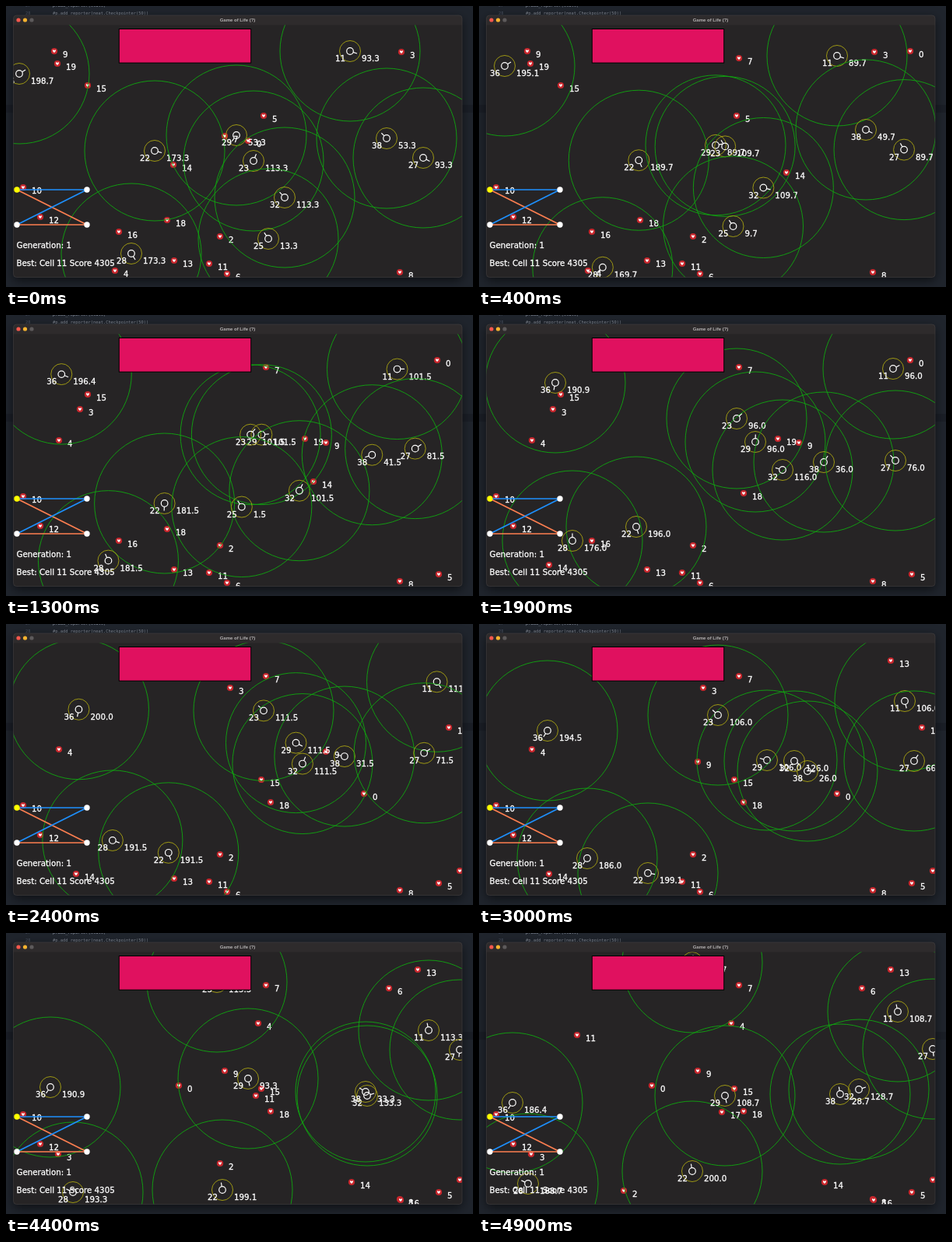
An HTML page with a canvas that plays this animation: 600 by 361 pixels, repeating every 5000 ms.

```html
<!DOCTYPE html>
<html lang="en">
<head>
<meta charset="utf-8">
<title>Game of Life (?)</title>
<style>
html, body { margin: 0; width: 100%; height: 100%; overflow: hidden; background: #20252d; }
canvas { display: block; width: 600px; height: 361px; }
</style>
</head>
<body>
<canvas id="stage" width="600" height="361"></canvas>
<script>
const ctx = document.getElementById('stage').getContext('2d');
const STEP = 100, STEPS = 50;
const SPEED = 4.85, BURN = 0.91, MEAL = 20, MAX_ENERGY = 200, REACH = 14.8;
const KEYS = [0, 8, 19, 30, 36, 44, 49];   // steps at which cells pass their key points
const cells = [], foods = [];

const pairs = a => a.flatMap((v, i) => i % 2 ? [] : [[v, a[i + 1]]]);
const dist = (p, q) => Math.hypot(p[0] - q[0], p[1] - q[1]);
const cell = (id, energy, ...path) => cells.push({ id, energy, path: pairs(path) });
// A food jumps to its next spot when eaten
const food = (id, ...spots) => foods.push({ id, spots: pairs(spots) });

cell(11, 93.3, 442, 58, 478, 70, 532, 69, 547, 99, 554, 128, 543, 125, 538, 101);
cell(36, 198.7, 17, 87, 49, 67, 98, 87, 88, 137, 72, 162, 57, 198, 43, 218);
cell(22, 173.3, 191, 186, 205, 217, 202, 272, 217, 320, 247, 325, 278, 330, 274, 306);
cell(28, 173.3, 161, 318, 141, 337, 120, 290, 139, 301, 122, 325, 86, 333, 63, 322);
cell(29, 53.3, 296, 166, 307, 164, 355, 163, 370, 175, 341, 167, 311, 187, 316, 209);
cell(23, 113.3, 318, 199, 300, 171, 331, 133, 307, 117, 286, 97, 271, 63, 274, 38);
cell(32, 113.3, 358, 246, 366, 248, 390, 199, 405, 176, 431, 193, 464, 209, 488, 201);
cell(38, 53.3, 489, 170, 493, 172, 443, 189, 422, 189, 451, 192, 462, 204, 464, 207);
cell(27, 93.3, 536, 195, 532, 188, 535, 187, 559, 176, 575, 151, 583, 150, 583, 149);
cell(25, 13.3, 337, 299, 316, 267, 287, 222);

food(0, 311, 173, 554, 58, 460, 218, 474, 216, 222, 196);
food(2, 275, 296, 186, 331);
food(3, 508, 59, 95, 121, 288, 82, 67, 284);
food(4, 140, 340, 68, 161, 324, 116);
food(5, 331, 141, 556, 333);
food(6, 284, 344, 492, 71);
food(7, 281, 167, 334, 67);
food(8, 506, 342);
food(9, 62, 58, 411, 164, 281, 177);
food(10, 22, 233);
food(11, 261, 331, 321, 209, 126, 131);
food(12, 44, 271);
food(13, 216, 327, 529, 47);
food(14, 215, 204, 395, 214, 90, 321, 444, 320);
food(15, 105, 102, 330, 112, 328, 200);
food(16, 145, 290, 569, 133, 507, 343);
food(17, 270, 45, 312, 230);
food(18, 207, 275, 340, 229);
food(19, 66, 74, 384, 159, 583, 317);

// Half the turn of an arc whose chord is the given share of its length
function halfTurn(share) {
  if (share > 0.91) return 1e-6;
  let lo = 0, hi = Math.PI;
  for (let i = 0; i < 30; i++) {
    const mid = (lo + hi) / 2;
    if (Math.sin(mid) / mid > share) lo = mid; else hi = mid;
  }
  return lo;
}

// Cells keep their speed, so between near points they swing out in an arc
function makeArc(a, b, steps) {
  const chord = dist(a, b), turn = halfTurn(chord / (SPEED * steps));
  const base = Math.atan2(b[1] - a[1], b[0] - a[0]);
  const at = (u, side) => {
    const r = chord * Math.sin(turn * u) / Math.sin(turn);
    const dir = base + side * turn * (1 - u);
    return [a[0] + r * Math.cos(dir), a[1] + r * Math.sin(dir)];
  };
  const gap = side => Math.min(...foods.map(f => dist(f.spots[0], at(0.5, side))));
  const side = gap(1) < gap(-1) ? 1 : -1;   // towards the nearest food
  return u => ({ pos: at(u, side), heading: base + side * turn * (1 - 2 * u) });
}

function move(c, step) {
  const last = c.path.length - 2;
  const i = Math.min(last, KEYS.findLastIndex(k => k <= step));
  const span = KEYS[i + 1] - KEYS[i];
  if (step === KEYS[i]) c.arc = makeArc(c.path[i], c.path[i + 1], span);
  Object.assign(c, c.arc((step - KEYS[i]) / span));
}

function eat(c) {
  for (const f of foods) {
    if (f.spots.length > 1 && dist(c.pos, f.spots[0]) < REACH) {
      f.spots.shift();
      c.energy = Math.min(MAX_ENERGY, c.energy + MEAL);
    }
  }
}

// Play the whole loop once and keep every state
const states = Array.from({ length: STEPS }, (_, step) => {
  const alive = cells.filter(c => c.energy > 0);
  for (const c of alive) {
    move(c, step);
    if (step) {
      c.energy -= BURN;
      eat(c);
    }
  }
  return {
    cells: alive.filter(c => c.energy > 0).map(c => ({ ...c })),
    foods: foods.map(f => ({ id: f.id, pos: f.spots[0] }))
  };
});

function rect(x, y, w, h, color) {
  ctx.fillStyle = color;
  ctx.fillRect(x, y, w, h);
}
function disc(x, y, r, color) {
  ctx.fillStyle = color;
  ctx.beginPath();
  ctx.arc(x, y, r, 0, 7);
  ctx.fill();
}
function ring(x, y, r, color, width = 0.9) {
  ctx.strokeStyle = color;
  ctx.lineWidth = width;
  ctx.beginPath();
  ctx.arc(x, y, r, 0, 7);
  ctx.stroke();
}
function line(x1, y1, x2, y2, color, width) {
  ctx.strokeStyle = color;
  ctx.lineWidth = width;
  ctx.beginPath();
  ctx.moveTo(x1, y1);
  ctx.lineTo(x2, y2);
  ctx.stroke();
}
function text(s, x, y, font, color, align = 'left') {
  ctx.font = font;
  ctx.fillStyle = color;
  ctx.textAlign = align;
  ctx.fillText(s, x, y);
}
function label(s, x, y) {
  text(s, x, y, '10.25px "DejaVu Sans", sans-serif', '#fff');
  ctx.strokeStyle = '#fff';
  ctx.lineWidth = 0.3;
  ctx.strokeText(s, x, y);
}

function drawDesktop() {
  rect(0, 0, 600, 361, '#20252d');
  rect(0, 127, 600, 10, '#1b1f27');
  const mono = '5.4px "DejaVu Sans Mono", monospace';
  text('27', 25, 1, mono, '#4b5263');
  text('28', 25, 11, mono, '#4b5263');
  text('p.add_reporter(stats)', 60, 1, mono, '#9aa2b1');
  text('#p.add_reporter(neat.Checkpointer(50))', 60, 11, mono, '#858b96');
}

function drawFood({ id, pos: [x, y] }) {
  disc(x, y, 4.1, '#c9272d');
  ctx.fillStyle = '#fff';
  ctx.beginPath();
  ctx.moveTo(x, y + 2);
  ctx.bezierCurveTo(x - 3.8, y - 1, x - 1.3, y - 2.8, x, y - 0.8);
  ctx.bezierCurveTo(x + 1.3, y - 2.8, x + 3.8, y - 1, x, y + 2);
  ctx.fill();
  label(id, x + 11, y + 8);
}

function drawCell({ id, energy, pos: [x, y], heading }) {
  const cos = Math.cos(heading), sin = Math.sin(heading);
  ring(x, y, 90, '#10a810');
  ring(x, y, 13.5, '#aaa412');
  ring(x, y, 4.3, '#fff', 1.2);
  line(x + cos * 4.3, y + sin * 4.3, x + cos * 9.5, y + sin * 9.5, '#fff', 1.2);
  label(id, x - 19, y + 13);
  label(energy.toFixed(1), x + 15, y + 13);
}

function drawNet() {
  const L = 14, R = 104, T = 236, B = 281, blue = '#1e90ff', coral = '#ff7f50';
  line(L, T, R, T, blue, 1.7);
  line(L, T, R, B, coral, 1.7);
  line(L, B, R, T, blue, 1.7);
  line(L, B, R, B, coral, 1.7);
  disc(L, T, 3.7, '#ffff00');
  for (const [x, y] of [[R, T], [L, B], [R, B]]) disc(x, y, 3.7, '#fff');
}

function drawWindow(state) {
  const frame = new Path2D();
  frame.roundRect(9.5, 12, 576.5, 336.5, 4);
  ctx.save();
  ctx.shadowColor = 'rgba(0, 0, 0, .6)';
  ctx.shadowBlur = 14;
  ctx.shadowOffsetY = 4;
  ctx.fillStyle = '#262425';
  ctx.fill(frame);
  ctx.restore();

  ctx.save();
  ctx.clip(frame);
  state.foods.forEach(drawFood);
  state.cells.forEach(drawCell);

  rect(144.8, 29, 170.4, 44.6, '#000');
  rect(145.8, 30, 168.4, 42.6, '#e0115f');
  drawNet();
  label('Generation: 1', 13.5, 311);
  label('Best: Cell 11 Score 4305', 13.5, 333.5);

  rect(9, 12, 578, 12.5, '#2e2b2c');
  disc(16, 18, 2.6, '#f4574d');
  disc(24.5, 18, 2.6, '#f5b32f');
  disc(33, 18, 2.6, '#5d5a5b');
  text('Game of Life (?)', 297.5, 20, 'bold 6px "Liberation Sans", Arial, sans-serif', '#b5b2b3', 'center');
  ctx.restore();
  ctx.strokeStyle = '#444142';
  ctx.lineWidth = 0.6;
  ctx.stroke(frame);
}

function frame(now) {
  drawDesktop();
  drawWindow(states[Math.floor(now / STEP) % STEPS]);
  requestAnimationFrame(frame);
}
requestAnimationFrame(frame);
</script>
</body>
</html>
```
